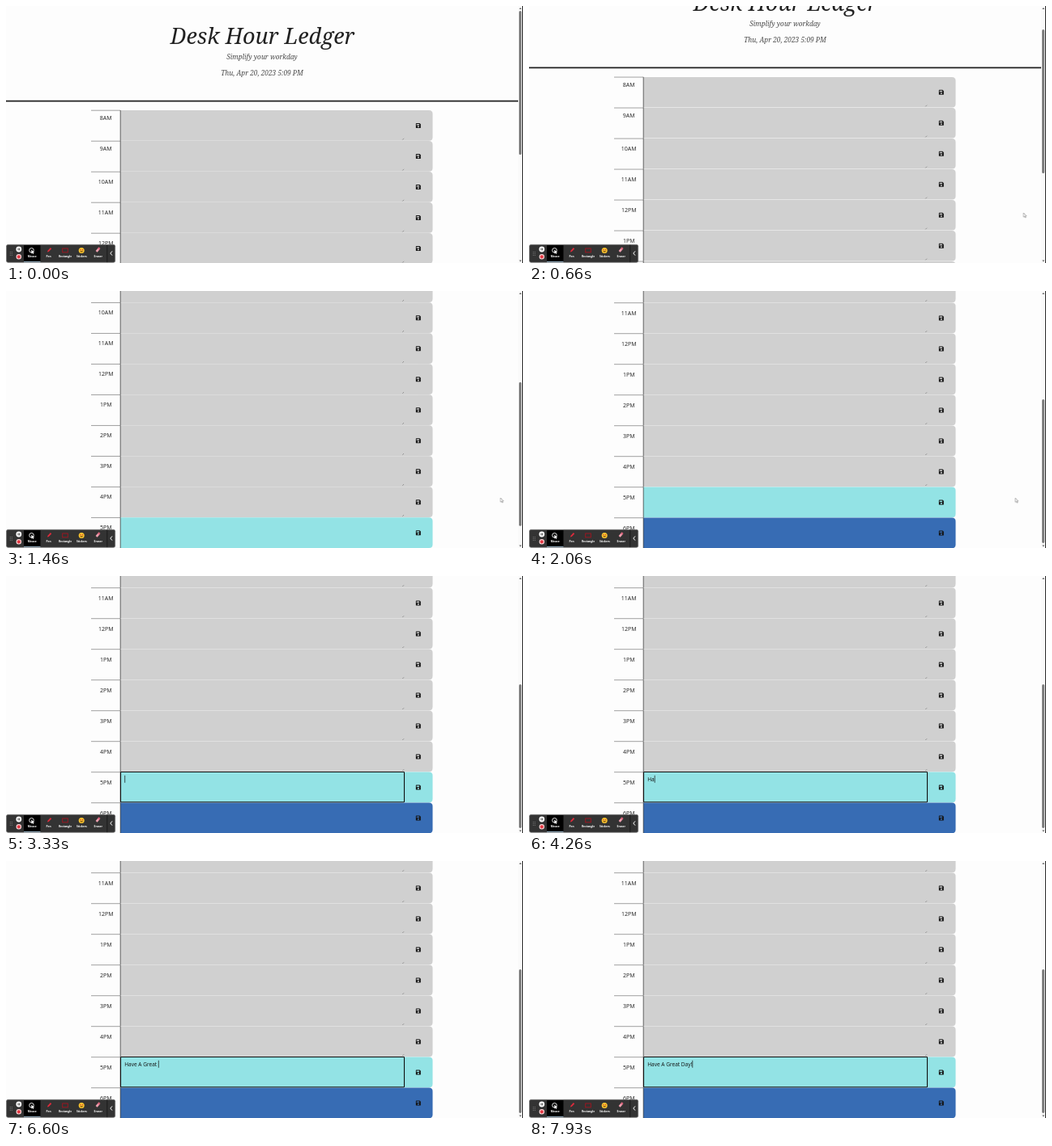
An HTML page for the animation above (8 s loop, 638 px wide and 318 px high).

```html
<!DOCTYPE html>
<html lang="en">
<head>
<meta charset="utf-8">
<title>Day planner</title>
<style>
@property --scroll { syntax: "<number>"; inherits: true; initial-value: 0; }
html, body { margin: 0; width: 100%; height: 100%; overflow: hidden; background: #fdfdfd; }
svg { display: block; width: 638px; height: 318px; animation: scroll 8s linear infinite; }
text { text-anchor: middle; white-space: pre; }
#page { transform: translateY(calc(var(--scroll) * -1px)); }
#thumb { transform: translateY(calc(var(--scroll) * .56px)); }
.serif { font-family: "Noto Serif", serif; font-style: italic; font-size: 8.3px; fill: #484848; }
.serif.title { font-size: 27px; fill: #212121; }
.hour { font: 7px "Open Sans", sans-serif; fill: #222; }
#note { font: 6.55px "Open Sans", sans-serif; fill: #111; text-anchor: start; }
.tool { font: bold 3.3px "Open Sans", sans-serif; fill: #fff; }
#pointer { animation: point 8s linear infinite; }
#focus { animation: focus 8s step-end infinite; }
@keyframes scroll {
  0%, .75% { --scroll: 0; animation-timing-function: cubic-bezier(.4, 0, .8, .7); }
  8.25% { --scroll: 41; }
  14.125% { --scroll: 112; }
  18.25% { --scroll: 190.5; animation-timing-function: cubic-bezier(.2, .45, .5, 1); }
  22.5%, 100% { --scroll: 228.5; }
}
@keyframes point {
  0%, 3.7% { transform: translate(610.3px, 256px); visibility: hidden; }
  3.75%, 24.5% { transform: translate(610.3px, 256px); visibility: visible; animation-timing-function: ease-in-out; }
  31.2% { transform: translate(470px, 258px); visibility: visible; }
  31.25%, 100% { transform: translate(470px, 258px); visibility: hidden; }
}
@keyframes focus {
  0% { visibility: hidden; }
  34.85%, 100% { visibility: visible; }
}
</style>
</head>
<body>
<svg id="stage" viewBox="0 0 638 318">
  <defs>
    <g id="save">
      <path fill-rule="evenodd" fill="#151515" d="M-2.5-3H1.7L3-1.7V2.4Q3 3 2.4 3H-2.4Q-3 3-3 2.4V-2.5Q-3-3-2.5-3ZM-2.1-2.1V-.5H1.2V-2.1ZM0 .3A.95.95 0 1 0 .01 .3Z"/>
    </g>
  </defs>
  <g id="page">
    <text class="serif title" x="316.5" y="47">Desk Hour Ledger</text>
    <text class="serif" x="316" y="66">Simplify your workday</text>
    <text class="serif" x="316" y="86">Thu, Apr 20, 2023 5:09 PM</text>
    <path d="M0 117.6H632" stroke="#212121" stroke-width="1.7"/>
    <g id="rows"></g>
    <rect id="focus" x="141.5" y="471" width="350" height="37.3" rx=".8" fill="none" stroke="#111" stroke-width="1.1"/>
    <text id="note" x="146.2" y="482"></text>
    <path id="caret" d="M0 475.3v9" stroke="#111" stroke-width=".7"/>
  </g>

  <rect x="632" width="6" height="318" fill="#fafafa"/>
  <rect id="thumb" x="633" y="6" width="3.2" height="178" rx="1.6" fill="#808080"/>
  <path d="M633.2 4l1.6-2 1.6 2ZM633.2 314.5l1.6 2 1.6-2Z" fill="#666"/>
  <rect x="637" width="1" height="318" fill="#2b2b2b"/>

  <path id="pointer" d="M0 0V5.2L1.3 4.2 2.1 6 3 5.6 2.2 3.8H3.7Z" fill="#fff" stroke="#666" stroke-width=".5"/>

  <g id="toolbar">
    <rect x=".5" y="295.3" width="134.2" height="22" rx="2" fill="#333" stroke="#777" stroke-width=".7"/>
    <path d="M124.8 295.6v21.5" stroke="#111" stroke-width=".7"/>
    <path d="M5.3 304v5M7.3 304v5" stroke="#999" stroke-width=".8" stroke-dasharray=".8 1.2"/>
    <circle cx="15.8" cy="301" r="3.4" fill="#fff"/>
    <path d="M15 299.6v2.8M16.7 299.6v2.8" stroke="#222" stroke-width=".8"/>
    <circle cx="15.8" cy="310.3" r="2.7" fill="#e53945" stroke="#f6d5d5" stroke-width="1.1"/>
    <rect x="22" y="296" width="20.5" height="20.5" fill="#000"/>
    <path d="M22 316.4h20.5" stroke="#a9c7dc" stroke-width=".9"/>
    <circle cx="31.5" cy="302.3" r="2.8" fill="none" stroke="#fff" stroke-width=".9"/>
    <path d="M31.3 301.5v5l1.3-1 .9 1.6.9-.5-.9-1.5h1.6Z" fill="#fff"/>
    <path d="M51 304.5l.5-1.8 3.4-3.6 1.3 1.3-3.5 3.5Z" fill="#e02b3c"/>
    <rect x="69.7" y="300" width="6.6" height="4.8" fill="none" stroke="#a51420" stroke-width=".9"/>
    <circle cx="93.2" cy="302.5" r="3.5" fill="#f8c62f"/>
    <path d="M91.2 303.2q2 2.8 4 0Z" fill="#6b3d10"/>
    <path d="M91.3 301.6h1.2M93.9 301.6h1.2" stroke="#d8382e" stroke-width="1.1"/>
    <path d="M111.6 303.8l3-3.5" stroke="#f3a0b0" stroke-width="2.6"/>
    <path d="M114 301l1.6-1.8" stroke="#d9637c" stroke-width="2.6"/>
    <path d="M131 303.4l-2.2 2.6 2.2 2.6" fill="none" stroke="#fff" stroke-width="1"/>
  </g>
</svg>
<script>
const find = id => document.getElementById(id);
const hours = ["8AM", "9AM", "10AM", "11AM", "12PM", "1PM", "2PM", "3PM", "4PM", "5PM", "6PM"];
const present = 9;

const row = (hour, i) => {
  const top = 129 + i * 38;
  const color = i < present ? "#d0d0d0" : i === present ? "#93e3e5" : "#376cb4";
  const grip = i < present
    ? `<path d="M489.3 ${top + 36.5}l1.7-1.7" stroke="#666" stroke-width=".6"/>` : "";
  return `<path d="M105 ${top + .2}h36" stroke="#8a8a8a" stroke-width=".8"/>
    <text class="hour" x="123.2" y="${top + (i < 2 ? 11.9 : 15)}">${hour}</text>
    <path d="M141 ${top + .1}h381q4.5 0 4.5 4.5v28.6q0 4.5-4.5 4.5H141Z" fill="${color}"/>
    <path d="M141.2 ${top}v38" stroke="#444" stroke-width=".8"/>${grip}
    <use href="#save" x="508.8" y="${top + 19}"/>`;
};
find("rows").innerHTML = hours.map(row).join("");

find("toolbar").insertAdjacentHTML("beforeend",
  ["Mouse", "Pen", "Rectangle", "Stickers", "Eraser"]
    .map((name, i) => `<text class="tool" x="${32.2 + i * 20.4}" y="311.2">${name}</text>`).join(""));

const message = "Have A Great Day!";
const keyTimes = [3950, 4150, 4350, 4500, 4650, 4900, 5100, 5500, 5700,
  5850, 6000, 6150, 6350, 6700, 6900, 7100, 7500];
const focusTime = 2788, blink = 550;
const note = find("note"), caret = find("caret");
const clock = find("stage").getAnimations()[0];

function draw() {
  const t = (clock.currentTime || 0) % 8000;
  const typed = keyTimes.filter(k => k <= t).length;
  const lastKey = typed ? keyTimes[typed - 1] : focusTime;
  note.textContent = message.slice(0, typed);
  const width = typed ? note.getComputedTextLength() : 0;
  caret.setAttribute("transform", `translate(${146.7 + width})`);
  const lit = t >= focusTime && (t - lastKey) % (2 * blink) < blink;
  caret.style.visibility = lit ? "visible" : "hidden";
  requestAnimationFrame(draw);
}
draw();
</script>
</body>
</html>
```
